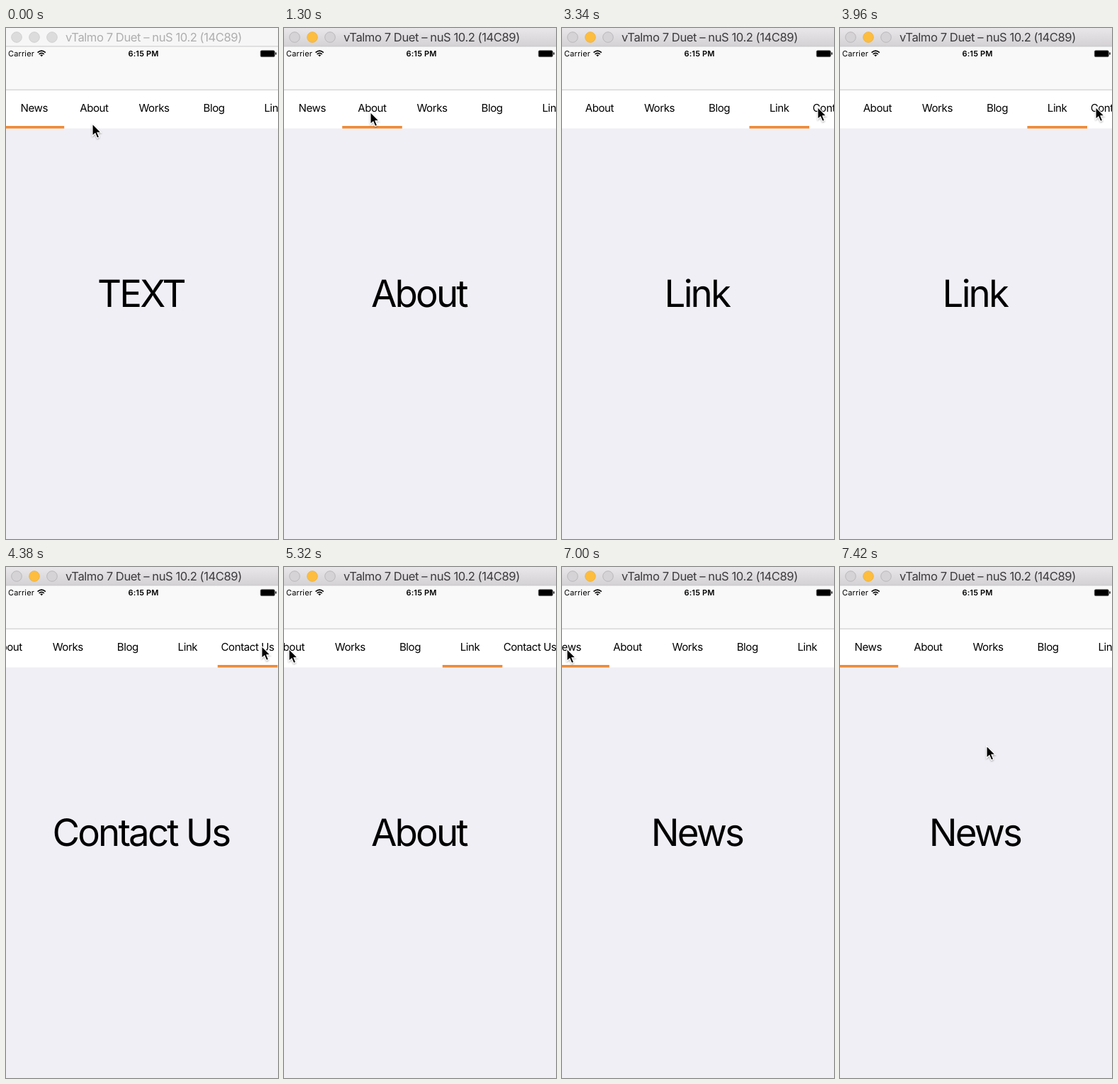
Animation, 384 px wide and 720 px high, one loop 7.6 s. Source, as an HTML page:

```html
<!DOCTYPE html>
<html lang="en">
<head>
<meta charset="utf-8">
<title>Scrolling tab bar</title>
<style>
  html, body { margin: 0; width: 100%; height: 100%; overflow: hidden; background: #f0eff5; }
  svg { display: block; width: 384px; height: 720px; }
  text { font-family: Inter, "Open Sans", sans-serif; fill: #000; text-rendering: geometricPrecision; }
  .title { font-size: 16.6px; letter-spacing: -.44px; }
  .status { font-size: 11px; letter-spacing: .15px; }
  .tab { font-size: 15.1px; letter-spacing: -.45px; text-anchor: middle; }
  .page { font-size: 52.8px; letter-spacing: -2.8px; text-anchor: middle; }
</style>
</head>
<body>
<svg viewBox="0 0 384 720">
  <defs>
    <linearGradient id="chrome" x2="0" y2="1">
      <stop stop-color="#e9e7ea"/><stop offset="1" stop-color="#d3d1d4"/>
    </linearGradient>
    <filter id="shade" x="-50%" y="-50%" width="200%" height="200%">
      <feDropShadow dx="0" dy="1.2" stdDeviation="1" flood-opacity=".35"/>
    </filter>
  </defs>
  <rect width="384" height="720" fill="#f0eff5"/>

  <rect id="bar" width="384" height="26"/>
  <g id="dots" stroke-width="1"></g>
  <text id="title" class="title" x="84" y="19">vTalmo 7 Duet – nuS 10.2 (14C89)</text>

  <rect y="26" width="384" height="61" fill="#f9f9f9"/>
  <rect y="25.4" width="384" height="1" fill="#c9c8ca"/>
  <text class="status" x="3" y="40">Carrier</text>
  <text class="status" x="194" y="40" text-anchor="middle" font-weight="600">6:15 PM</text>
  <g fill="none" stroke="#000" stroke-width="1.6">
    <path d="M44.6 34.6Q50.2 29.6 55.8 34.6M46.6 37Q50.2 33.8 53.8 37"/>
    <path d="M48.2 38.2Q50.2 36.6 52.2 38.2L50.2 40.2Z" fill="#000" stroke="none"/>
  </g>
  <rect x="359.3" y="31.8" width="20" height="8.8" rx="1.6" stroke="#555" stroke-width=".8"/>
  <rect x="380.3" y="34.3" width="1.4" height="3.4" rx=".6"/>

  <rect y="87" width="384" height="54.5" fill="#fff"/>
  <rect y="86.6" width="384" height="1" fill="#c4c4c6"/>
  <g id="strip">
    <g id="tabs"></g>
    <rect id="line" y="138" width="84.6" height="3.6" fill="#f08a35"/>
  </g>

  <text id="page" class="page" x="190.4" y="392.8"></text>
  <path id="cursor" d="M0 0V17L3.9 13.4L6.7 20L9.6 18.8L6.9 12.3H12.2Z"
    stroke="#fff" stroke-width="1.1" filter="url(#shade)"/>
</svg>
<script>
const LOOP = 7600, TAB = 84.6, SCROLL_MS = 350, LINE_MS = 205, FOCUS = 240;
const names = ["News", "About", "Works", "Blog", "Link", "Contact Us"];

// [time, tab, scroll offset]
const taps = [[-999, 0, 0], [310, 1, 0], [2260, 2, 0], [3000, 4, 71.6],
              [4020, 5, 121.8], [5250, 1, 47.2], [6860, 0, 0]];
// [time, x, y]
const moves = [[0, 122, 135], [160, 122, 118.5], [1320, 122, 118.5], [1540, 207, 116],
               [2400, 207, 116], [2700, 361, 111.5], [4720, 361, 111.5], [5020, 7, 115.5],
               [7000, 7, 115.5], [7400, 207, 252]];

const $ = id => document.getElementById(id);
const clamp = t => Math.max(0, Math.min(1, t));
const ease = t => t < .5 ? 2 * t * t : 1 - 2 * (1 - t) ** 2;
const mix = (a, b, t) => a + (b - a) * t;

function add(parent, tag, attrs, text = "") {
  const el = document.createElementNS("http://www.w3.org/2000/svg", tag);
  for (const key in attrs) el.setAttribute(key, attrs[key]);
  el.textContent = text;
  return parent.appendChild(el);
}

names.forEach((name, i) => add($("tabs"), "text", { class: "tab", x: 39.8 + i * TAB, y: 118 }, name));
const dots = [15, 40, 65].map(cx => add($("dots"), "circle", { cx, cy: 13, r: 7.3 }));

function setFocus(on) {
  $("bar").setAttribute("fill", on ? "url(#chrome)" : "#f6f6f6");
  $("title").style.fill = on ? "#3c3a3d" : "#aeaeae";
  dots.forEach((dot, i) => {
    const lit = on && i === 1;
    dot.setAttribute("fill", lit ? "#fdbd3e" : on ? "#d6d3d7" : "#dcdcdc");
    dot.setAttribute("stroke", lit ? "#f0b444" : on ? "#bbb8bc" : "#d0d0d0");
  });
}

function cursorAt(t) {
  const i = moves.findLastIndex(m => m[0] <= t);
  const [t0, x0, y0] = moves[i], [t1, x1, y1] = moves[i + 1] || [LOOP, x0, y0];
  const k = ease((t - t0) / (t1 - t0));
  return [mix(x0, x1, k), mix(y0, y1, k)];
}

function draw(t) {
  const i = taps.findLastIndex(s => s[0] <= t);
  const [start, tab, scroll] = taps[i], [, oldTab, oldScroll] = taps[Math.max(0, i - 1)];
  const progress = ms => ease(clamp((t - start) / ms));
  const offset = mix(oldScroll, scroll, progress(SCROLL_MS));
  setFocus(t >= FOCUS);
  $("strip").setAttribute("transform", `translate(${-offset})`);
  $("line").setAttribute("x", mix(oldTab, tab, progress(LINE_MS)) * TAB - 2.4);
  $("page").textContent = i ? names[tab] : "TEXT";
  $("cursor").setAttribute("transform", `translate(${cursorAt(t)})`);
}

const begin = performance.now();
function tick() {
  draw((performance.now() - begin) % LOOP);
  requestAnimationFrame(tick);
}
tick();
</script>
</body>
</html>
```
